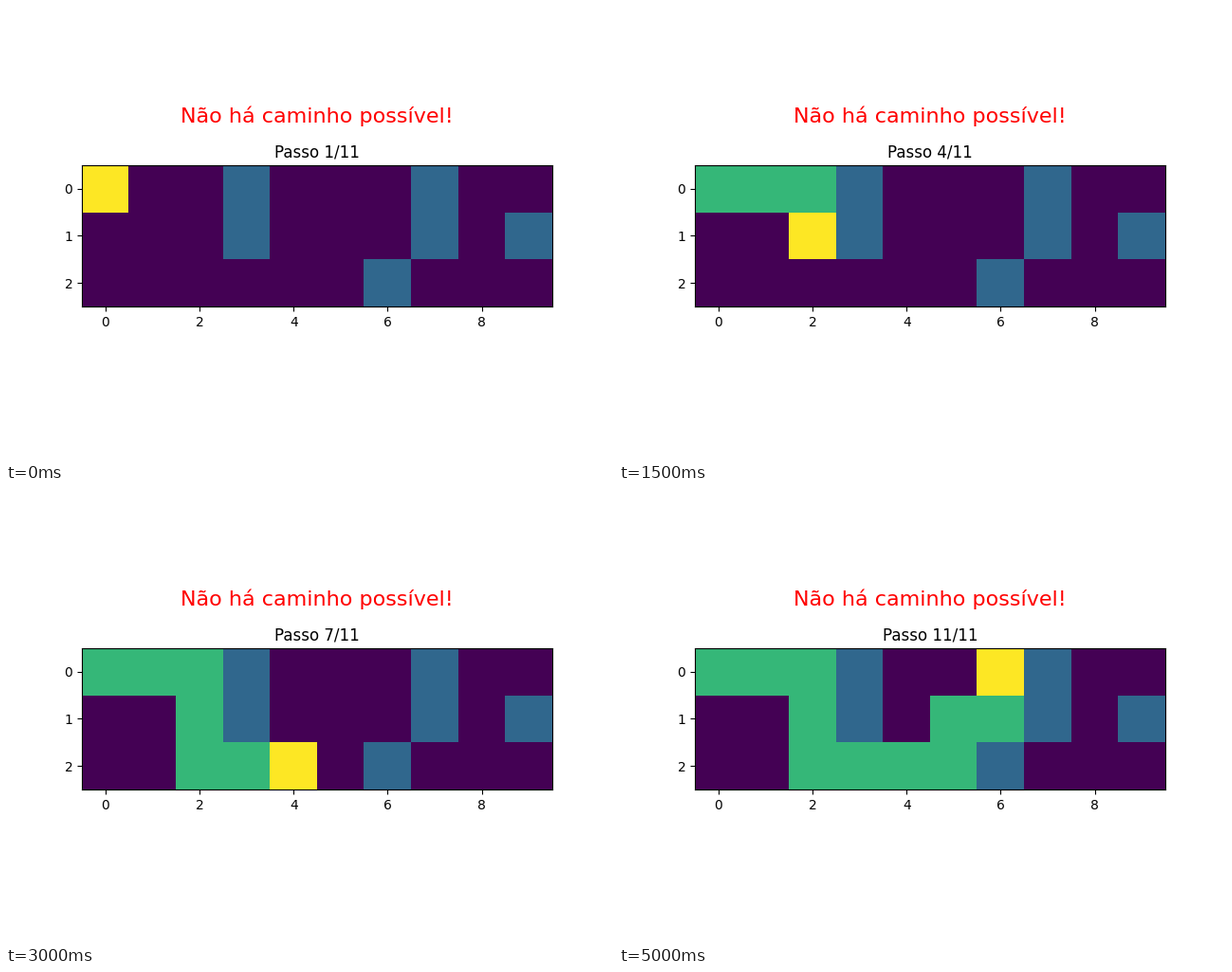
A matplotlib script for the animation above (5.5 s loop, 640 by 480 pixels).

```python
import matplotlib.pyplot as plt
import numpy as np
from matplotlib.animation import FuncAnimation

ROWS, COLS = 3, 10
FREE, WALL, VISITED, CURRENT = range(4)
RIGHT, DOWN, UP = (0, 1), (1, 0), (-1, 0)
STEP_MS = 500


def make_maze():
    maze = np.full((ROWS, COLS), FREE)
    maze[:2, 3::4] = WALL
    maze[1, -1] = maze[2, 6] = WALL
    return maze


def walk(maze):
    """Take the first open move, right before down before up, until stuck."""
    path = [(0, 0)]
    while True:
        row, col = path[-1]
        for dr, dc in (RIGHT, DOWN, UP):
            r, c = row + dr, col + dc
            inside = 0 <= r < ROWS and 0 <= c < COLS
            if inside and maze[r, c] == FREE and (r, c) not in path:
                path.append((r, c))
                break
        else:
            return path


maze = make_maze()
path = walk(maze)

fig, ax = plt.subplots(figsize=(6.4, 4.8), dpi=100)
image = ax.imshow(maze, cmap="viridis", vmin=FREE, vmax=CURRENT,
                  interpolation="nearest")
title = ax.set_title("")
ax.text(0.5, 1.3, "Não há caminho possível!", transform=ax.transAxes,
        ha="center", fontsize=16, color="red")


def update(step):
    grid = maze.copy()
    for cell in path[:step]:
        grid[cell] = VISITED
    grid[path[step]] = CURRENT
    image.set_data(grid)
    title.set_text(f"Passo {step + 1}/{len(path)}")
    return image, title


anim = FuncAnimation(fig, update, frames=len(path), interval=STEP_MS,
                     repeat=True, repeat_delay=0)
plt.show()
```
